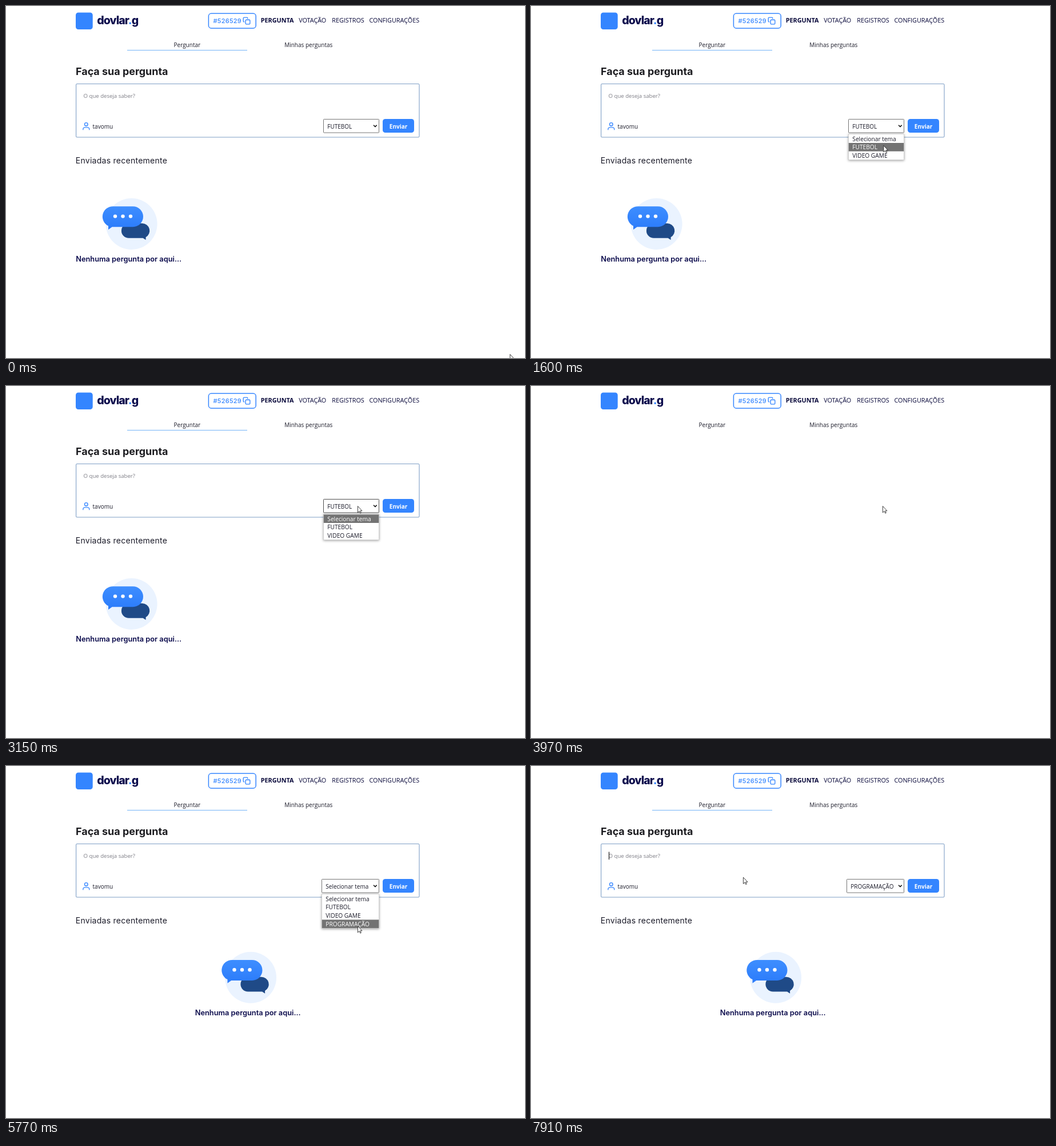
An HTML page that plays this animation: 908x617 px, repeating every 8 s.

```html
<!DOCTYPE html>
<html lang="pt-BR">
<head>
<meta charset="utf-8">
<title>Faça sua pergunta</title>
<style>
  html, body { margin: 0; width: 100%; height: 100%; overflow: hidden; background: #fff; }
  svg { display: block; width: 100%; height: 100%; }
  text { font: 10px "Open Sans", sans-serif; fill: #1c1c2a; white-space: pre; }
  .inter { font-family: Inter, sans-serif; }
  .mid { text-anchor: middle; }
  .nav text { font-size: 10.8px; fill: #08083a; }
  .line { fill: none; stroke: #3485ff; stroke-width: 1.35; stroke-linecap: round; stroke-linejoin: round; }
  #list text { font-size: 10.2px; }
  #list { filter: drop-shadow(0 1px 2px rgba(0, 0, 0, .4)); }
</style>
</head>
<body>
<svg viewBox="0 0 908 617">
  <defs>
    <linearGradient id="blue" x2="0" y2="1">
      <stop stop-color="#3e8eff"/><stop offset="1" stop-color="#2b7bfa"/>
    </linearGradient>
  </defs>

  <rect x="122" y="11.5" width="29.7" height="29.5" rx="4.5" fill="#3485ff"/>
  <text class="inter" x="159.3" y="32" style="font-size:19.5px;font-weight:800;letter-spacing:-.95px;fill:#0b0b4c">dovlar<tspan fill="#3485ff">.</tspan>g</text>

  <rect class="line" x="354.4" y="13" width="82.8" height="26" rx="4.8" style="stroke-width:1.5"/>
  <text class="inter" x="362.6" y="29.7" style="font-size:11px;letter-spacing:.25px;font-weight:500;fill:#3485ff">#526529</text>
  <g class="line">
    <rect x="419.2" y="24.2" width="7.6" height="7.6" rx="1.2"/>
    <path d="M417 27.8h-.6a1.2 1.2 0 0 1-1.2-1.2v-5.2a1.2 1.2 0 0 1 1.2-1.2h5.2a1.2 1.2 0 0 1 1.2 1.2v.6"/>
  </g>
  <g class="nav">
    <text x="445.8" y="29.4" style="font-weight:700">PERGUNTA</text>
    <text x="512.2" y="29.4">VOTAÇÃO</text>
    <text x="570.3" y="29.4">REGISTROS</text>
    <text x="635.4" y="29.4">CONFIGURAÇÕES</text>
  </g>
  <text class="mid" x="316.8" y="71.6">Perguntar</text>
  <text class="mid" x="529.2" y="71.6">Minhas perguntas</text>

  <g id="page">
    <rect x="212" y="77" width="210" height="1" fill="#74b4f6"/>
    <text class="inter" x="122" y="120.8" style="font-size:17.95px;font-weight:700;fill:#1c1c20">Faça sua pergunta</text>
    <rect x="122.6" y="136.5" width="600.4" height="93.5" rx="1.8" fill="#fff" stroke="#7f9fc6" stroke-width="1.1"/>
    <text x="135.6" y="161" style="font-size:9.6px;fill:#7d7d85">O que deseja saber?</text>
    <rect id="caret" x="136" y="150.5" width="1" height="13.5" fill="#000"/>
    <g class="line">
      <circle cx="140.3" cy="207.4" r="2.8"/>
      <path d="M134.9 216.8v-1.2a2.8 2.8 0 0 1 2.8-2.8h5.2a2.8 2.8 0 0 1 2.8 2.8v1.2"/>
    </g>
    <text x="151.6" y="214.7">tavomu</text>
    <rect id="select" y="198.5" height="23.6" rx=".8" fill="#fff"/>
    <text id="choice" y="214.5"></text>
    <path d="M643 208.7l2.9 2.9 2.9-2.9" fill="none" stroke="#111" stroke-width="1.5"/>
    <rect x="659" y="198" width="55" height="24" rx="4.6" fill="#3485ff"/>
    <text class="mid" x="686.6" y="214.7" style="font-weight:700;fill:#fff">Enviar</text>

    <text class="inter" x="121.8" y="275.6" style="font-size:14px;letter-spacing:.26px">Enviadas recentemente</text>
    <g id="empty">
      <circle cx="219.6" cy="382" r="45" fill="#eaf3ff"/>
      <path d="M214.8 381h23.6a12.9 12.9 0 0 1 6.2 24.2v4.9l-5-3.3h-24.8a12.9 12.9 0 0 1 0-25.8z" fill="#1f4a87"/>
      <path d="M187 351.2h35a18 18 0 0 1 0 36h-36.4l-6.6 4.8v-6.6a18 18 0 0 1 8-34.2z" fill="url(#blue)"/>
      <g fill="#fff">
        <circle cx="191" cy="368.6" r="3.2"/><circle cx="204.5" cy="368.6" r="3.2"/><circle cx="218" cy="368.6" r="3.2"/>
      </g>
      <text class="inter mid" x="214.7" y="448.4" style="font-size:12.8px;font-weight:600;fill:#0b0b4c">Nenhuma pergunta por aqui...</text>
    </g>
    <g id="list"></g>
  </g>

  <g id="pointer">
    <circle id="click" r="8" fill="#f8ea2c" opacity=".8"/>
    <path id="arrow" d="M.4 .6v11.3l2.7-2.4 1.7 3.6 1.6-.8-1.7-3.5h3.3z" fill="#fff" stroke="#111" stroke-width=".8"/>
    <path id="beam" d="M-2.5-7.5q2 0 2.5.8.5-.8 2.5-.8M0-6.7v13.4M-2.5 7.5q2 0 2.5-.8.5.8 2.5.8" fill="none" stroke="#111" stroke-width=".9"/>
  </g>
</svg>
<script>
const LOOP = 8000, ROW_TOP = 225.3, ROW_H = 14.7, RIGHT = 652.5;
const OPTIONS = ['Selecionar tema', 'FUTEBOL', 'VIDEO GAME', 'PROGRAMAÇÃO'];

// Pointer stops: time, x, y
const PATH = [
  [0, 881.5, 610], [60, 881.5, 610], [810, 608, 246.5], [1020, 614, 211],
  [1340, 614, 211], [1600, 616.5, 244], [1810, 616, 257.5], [1960, 616, 257.5],
  [2340, 615.5, 228], [2440, 615.5, 228], [2620, 615, 211], [3150, 615, 210],
  [5250, 615, 210], [5770, 615, 280], [5830, 615, 283], [6080, 615, 283],
  [6780, 393, 154], [6980, 393, 152], [7450, 371, 194.5], [LOOP, 371, 194.5]
];

const $ = id => document.getElementById(id);
const show = (el, on) => el.setAttribute('visibility', on ? 'inherit' : 'hidden');
const set = (el, attrs) => { for (const k in attrs) el.setAttribute(k, attrs[k]); };
const within = (t, from, to) => t >= from && t < to;

function add(parent, tag, attrs = {}) {
  const el = document.createElementNS('http://www.w3.org/2000/svg', tag);
  set(el, attrs);
  return parent.appendChild(el);
}

const panel = add($('list'), 'rect', { y: 224.7, fill: '#fff', stroke: '#c4c4c4', 'stroke-width': .6 });
const mark = add($('list'), 'rect', { height: ROW_H, fill: '#737373' });
const rows = OPTIONS.map((label, i) => {
  const row = add($('list'), 'text', { y: ROW_TOP + ROW_H * i + 11.3 });
  row.textContent = label;
  return row;
});

function pointerAt(t) {
  const i = PATH.findIndex(p => p[0] > t);
  const [t0, x0, y0] = PATH[i - 1], [t1, x1, y1] = PATH[i];
  const u = (t - t0) / (t1 - t0), e = u * u * (3 - 2 * u);
  return [x0 + (x1 - x0) * e, y0 + (y1 - y0) * e];
}

function draw(t) {
  const [x, y] = pointerAt(t);
  const reloaded = t >= 4100;
  const left = t < 4300 ? 555.5 : 552.5;
  const width = RIGHT - left;
  const count = reloaded ? 4 : 3;

  show($('page'), !within(t, 3840, 4100));
  $('empty').setAttribute('transform', reloaded ? 'translate(208.5 -11.3)' : '');

  const hover = within(y, 198, 222) && within(x, left, RIGHT);
  set($('select'), { x: left, width, stroke: hover ? '#4f4f4f' : '#767676' });
  $('choice').setAttribute('x', left + 6.8);
  $('choice').textContent = OPTIONS[!reloaded ? 1 : t < 6100 ? 0 : 3];

  show($('list'), within(t, 1360, 3840) || within(t, 5100, 6100));
  const initial = t < 2000 ? 1 : 0;
  const active = y < ROW_TOP ? initial : Math.min(count - 1, Math.floor((y - ROW_TOP) / ROW_H));
  set(panel, { x: left, width, height: ROW_H * count + 1 });
  set(mark, { x: left + .3, width: width - .6, y: ROW_TOP + ROW_H * active });
  rows.forEach((row, i) => {
    row.setAttribute('x', left + 6.8);
    row.style.fill = i === active ? '#fff' : '';
    show(row, i < count);
  });

  show($('caret'), within(t, 6850, 7380) || t >= 7910);

  const typing = within(y, 140, 190) && within(x, 130, 716);
  $('pointer').setAttribute('transform', `translate(${x} ${y})`);
  show($('arrow'), !typing);
  show($('beam'), typing);
  show($('click'), [1290, 5030, 6030, 6840].some(c => within(t, c, c + 70)));
}

(function tick() {
  draw(performance.now() % LOOP);
  requestAnimationFrame(tick);
})();
</script>
</body>
</html>
```
